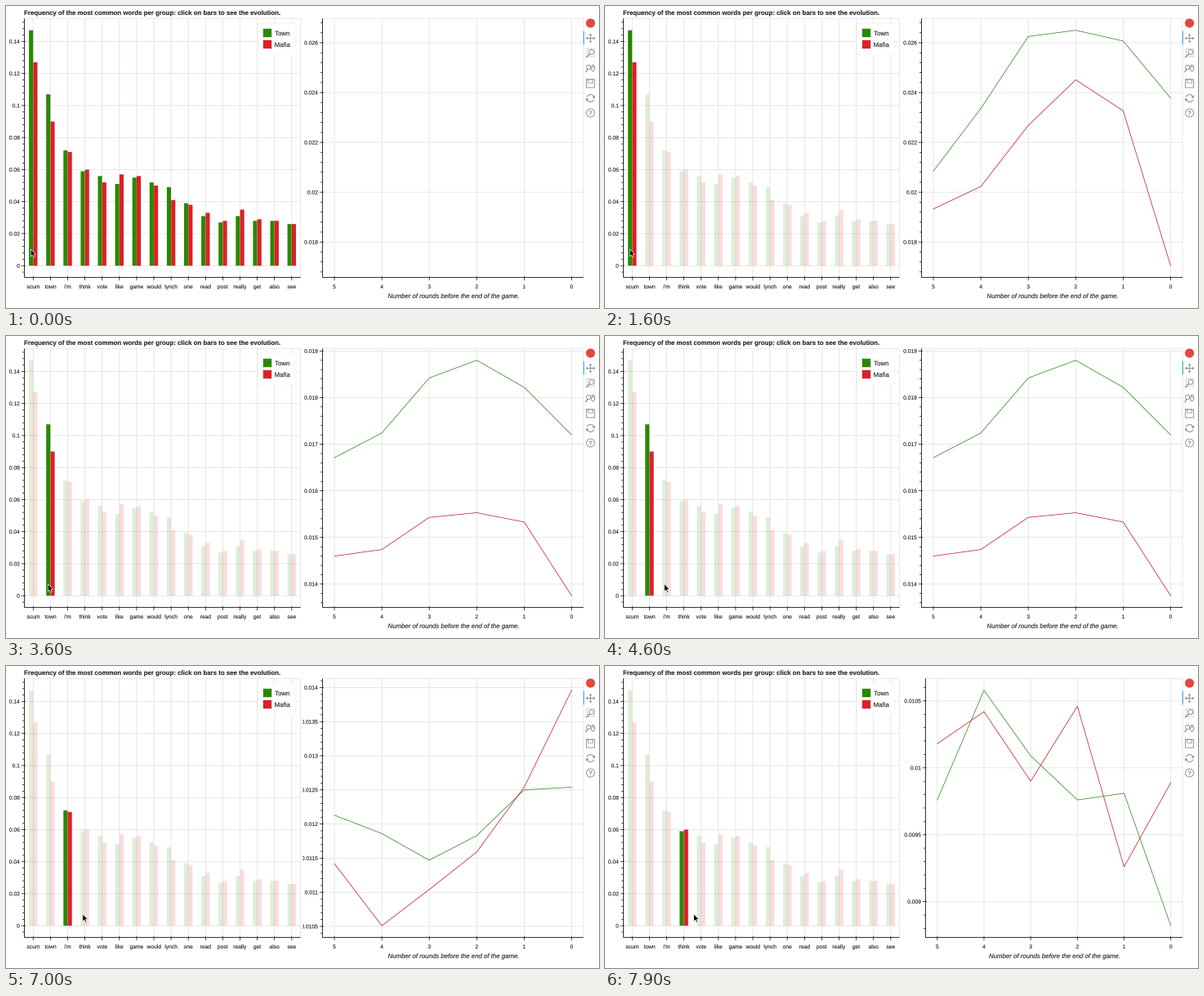
These frames come from a looping animation (726 by 370 pixels, 8000 ms). A matplotlib script:

```python
import math

import matplotlib.pyplot as plt
import numpy as np
from matplotlib.animation import FuncAnimation
from matplotlib.collections import LineCollection
from matplotlib.patches import Arc, Circle, PathPatch, Polygon, Rectangle
from matplotlib.textpath import TextPath
from matplotlib.transforms import Affine2D

W, H, DPI = 726, 370, 100
PX = 72 / DPI
FRAMES, STEP = 80, 100

TOP, BOTTOM = 15.3, 332.6
MARGIN = (BOTTOM - TOP) / 22  # 5 % of the data range on both sides
GREEN, RED = "#2a8800", "#dc2027"
GRID, AXIS, INK, ICON = "#e3e3e3", "#111111", "#222222", "#92969a"

# word: frequency per thousand for town and mafia
FREQ = {
    "scum": (147, 127), "town": (107, 90), "i'm": (72, 71), "think": (59, 60),
    "vote": (56, 52), "like": (51, 57), "game": (55, 56), "would": (52, 50),
    "lynch": (49, 41), "one": (39, 38), "read": (31, 33), "post": (27, 28),
    "really": (31, 35), "get": (28, 29), "also": (28, 28), "see": (26, 26),
}
# frequency by round, in 1e-5, for town and mafia
ROUNDS = {
    "scum": ([2085, 2336, 2625, 2650, 2607, 2378], [1933, 2023, 2268, 2451, 2327, 1705]),
    "town": ([1671, 1724, 1842, 1880, 1822, 1720], [1460, 1474, 1543, 1553, 1533, 1375]),
    "i'm": ([1213, 1186, 1147, 1183, 1250, 1254], [1142, 1051, 1104, 1159, 1254, 1396]),
    "think": ([976, 1058, 1009, 976, 981, 882], [1018, 1042, 990, 1046, 926, 989]),
}
CLICKS = [1600, 3600, 5400, 7100]

plt.rcParams["path.snap"] = False
fig = plt.figure(figsize=(W / DPI, H / DPI), dpi=DPI, facecolor="white")
ax = fig.add_axes([0, 0, 1, 1])
ax.set_xlim(0, W)
ax.set_ylim(H, 0)
ax.axis("off")


def text(s, x, y, size=6.7, align="center", clip=0, **font):
    """Place text by its ink edge and its baseline, in pixels."""
    path = TextPath((0, 0), s, size=size, prop={"family": "Liberation Sans", **font})
    box = path.get_extents()
    shift = {"left": box.x0, "right": box.x1, "center": (box.x0 + box.x1) / 2}[align]
    path = path.transformed(Affine2D().translate(-shift, 0).scale(1, -1).translate(x, y))
    patch = ax.add_patch(PathPatch(path, fc=INK, ec=INK, lw=0.12 * PX, zorder=6))
    patch.set_clip_path(Rectangle((clip, 0), W, H, transform=ax.transData))
    return patch


def segments(lines, color, z, width=0.85):
    return ax.add_collection(
        LineCollection(lines, colors=color, linewidths=width * PX, zorder=z))


def polyline(xs, ys, color, width, **kw):
    return ax.plot(xs, ys, color=color, lw=width * PX, zorder=4, **kw)[0]


def rect(x0, y0, x1, y1, z, **kw):
    return ax.add_patch(Rectangle((x0, y0), x1 - x0, y1 - y0, zorder=z, **kw))


def y_scale(lo, hi):
    k = (BOTTOM - TOP - 2 * MARGIN) / (hi - lo)
    return lambda v: BOTTOM - MARGIN - (np.asarray(v) - lo) * k


def plot_base(x0, x1, lo, hi, unit, xs, labels, clip=0):
    """Outline, grid, axes, ticks and labels; about six major ticks on y."""
    y, pad = y_scale(lo, hi), (hi - lo) / 20
    steps = (m * 10 ** e for e in range(4) for m in (1, 2, 5))
    minor = min(steps, key=lambda s: abs((hi - lo + 2 * pad) / s - 6)) / 5
    grid, ticks, out = [], [], []
    for k in range(math.ceil((lo - pad) / minor), math.floor((hi + pad) / minor) + 1):
        ty = float(y(k * minor))
        if k % 5:
            ticks.append([(x0 - 2.4, ty), (x0, ty)])
            continue
        grid.append([(x0, ty), (x1, ty)])
        ticks.append([(x0 - 3.6, ty), (x0 + 1.3, ty)])
        label = f"{round(k * minor * unit, 6):g}"
        out.append(text(label, x0 - 5.9, ty + 2.4, align="right", clip=clip))
    for x, s in zip(xs, labels):
        grid.append([(x, TOP), (x, BOTTOM)])
        ticks.append([(x, BOTTOM - 1.3), (x, BOTTOM + 3.6)])
        out.append(text(s, x, 346.1))
    spines = [[(x0, TOP), (x0, BOTTOM)], [(x0, BOTTOM), (x1, BOTTOM)]]
    outline = rect(x0, TOP, x1, BOTTOM, 1, fc="none", ec=GRID, lw=0.8 * PX)
    return out + [outline, segments(grid, GRID, 1), segments(ticks, AXIS, 5, 0.75),
                  segments(spines, AXIS, 5)]


def bar_chart(left=22.5, right=360.5):
    centers = 33.3 + 21.1 * np.arange(len(FREQ))
    top = max(max(v) for v in FREQ.values())
    y = y_scale(0, top)
    plot_base(left, right, 0, top, 1e-3, centers, FREQ)
    text("Frequency of the most common words per group: click on bars to see the evolution.",
         22.6, 10.9, 7.85, "left", weight="bold")
    rect(308.5, 21.5, 354.5, 59.5, 5, fc=(1, 1, 1, 0.95), ec="#f1f1f1", lw=0.6 * PX)
    for name, color, ly in (("Town", GREEN, 33), ("Mafia", RED, 47)):
        rect(314.8, ly - 5.2, 325.2, ly + 5.2, 6, fc=color, lw=0)
        text(name, 329.3, ly + 3.1, 7.85, "left")
    return [(rect(c - 5.2, y(town), c - 0.1, y(0), 3, fc=GREEN, lw=0),
             rect(c + 0.1, y(mafia), c + 5.2, y(0), 3, fc=RED, lw=0))
            for c, (town, mafia) in zip(centers, FREQ.values())]


def line_chart(town, mafia, left, right=707):
    lo, hi = min(town + mafia), max(town + mafia)
    pad = (right - left) / 22
    xs = np.linspace(left + pad, right - pad, 6)
    y = y_scale(lo, hi)
    base = plot_base(left, right, lo, hi, 1e-5, xs, "543210", clip=363.2)
    base.append(text("Number of rounds before the end of the game.",
                     (left + right) / 2 + 0.4, 357.9, 7.83, style="italic"))
    return base, [polyline(xs, y(town), "#2a8a1c", 0.75),
                  polyline(xs, y(mafia), "#c01f2a", 0.75)]


def toolbar(x=715.6):
    def icon(xs, ys, width=1.0, **kw):
        polyline(xs, ys, ICON, width, **kw)

    def ring(cx, cy, r):
        ax.add_patch(Circle((cx, cy), r, fc="none", ec=ICON, lw=PX, zorder=4))

    def head(*points):
        ax.add_patch(Polygon(points, fc=ICON, lw=0, zorder=4))

    def box(x0, y0, x1, y1, width=1.0, **kw):
        icon([x0, x1, x1, x0, x0], [y0, y0, y1, y1, y0], width, **kw)

    ax.add_patch(Circle((x, 21), 5.6, fc="#e2493b", lw=0, zorder=4))
    rect(706.8, 30.8, 707.9, 47.3, 6, fc="#26aae1", lw=0)
    # pan
    y = 39.5
    for dx, dy in ((1, 0), (-1, 0), (0, 1), (0, -1)):
        icon([x, x + 4.5 * dx], [y, y + 4.5 * dy])
        bx, by = x + 3.4 * dx, y + 3.4 * dy
        head((x + 5.8 * dx, y + 5.8 * dy), (bx + 2 * dy, by + 2 * dx),
             (bx - 2 * dy, by - 2 * dx))
    # box zoom
    y = 57.5
    box(x - 4, y - 5, x + 5, y + 4.5, 0.7, ls=(0, (2, 1.5)))
    ring(x + 1.2, y - 1, 2.9)
    icon([x - 0.9, x - 5], [y + 1.2, y + 5.2], 1.5)
    # wheel zoom
    y = 76
    ring(x - 2.4, y - 1, 2.6)
    icon([x - 3.8, x - 5.5], [y + 1.5, y + 4.6], 1.4)
    t = np.linspace(0, 2 * np.pi, 40)
    icon(x + 3 + 2.1 * np.cos(t), y + 3.9 * np.sin(t))
    icon([x + 3, x + 3], [y - 2.4, y - 0.4])
    # save
    y = 95
    box(x - 5, y - 5, x + 5, y + 5)
    box(x - 3, y - 5, x + 3, y - 0.8, 0.8)
    # reset
    y = 113
    for s, start in ((1, 20), (-1, 200)):
        ax.add_patch(Arc((x, y), 9, 9, theta1=start, theta2=start + 135,
                         ec=ICON, lw=1.1 * PX, zorder=4))
        head((x + 5.6 * s, y - 3.6 * s), (x + 5.4 * s, y + 0.2 * s), (x + 2 * s, y - s))
    # help
    y = 131
    ring(x, y, 5)
    text("?", x, y + 2.7, 7.4, weight="bold").set(fc=ICON, ec=ICON)


bars = bar_chart()
# the last chart's wider labels push its left edge in
lefts = [387.5] * 3 + [392.5]
charts = [line_chart(*data, left) for data, left in zip(ROUNDS.values(), lefts)]
toolbar()

ARROW = 1.05 * np.array([(0, 0), (0, 8.4), (1.9, 6.7), (3.2, 9.7), (4.6, 9.1),
                         (3.3, 6.2), (5.9, 6)])
pointer = ax.add_patch(Polygon(ARROW, fc="black", ec="white", lw=0.6 * PX, zorder=9))

# start, duration and length (in bars) of each pointer move
HOPS = [(2000, 800, 1), (3800, 800, 1), (5400, 1000, 1), (7400, 500, 0.7)]


def tip(t):
    """The pointer hops from bar to bar along a low arc."""
    pos = lift = 0
    for start, duration, length in HOPS:
        u = min(max((t - start) / duration, 0), 1)
        pos += length * u * u * (3 - 2 * u)
        lift += 20 * length * math.sin(math.pi * u)
    return np.array([30.3 + 21.2 * pos, 298 + 6 * min(pos, 1) - lift])


def update(i):
    t = i * STEP
    chosen = sum(t >= c for c in CLICKS) - 1
    for k, pair in enumerate(bars):
        for bar in pair:
            bar.set_alpha(1 if chosen in (-1, k) else 0.15)
    for k, (base, curves) in enumerate(charts):
        for part in base:
            part.set_visible(k == max(chosen, 0))
        for curve in curves:
            curve.set_visible(k == chosen)
    pointer.set_xy(ARROW + tip(t))
    return [pointer]


anim = FuncAnimation(fig, update, frames=FRAMES, interval=STEP, repeat=True,
                     repeat_delay=0, blit=False)
plt.show()
```
